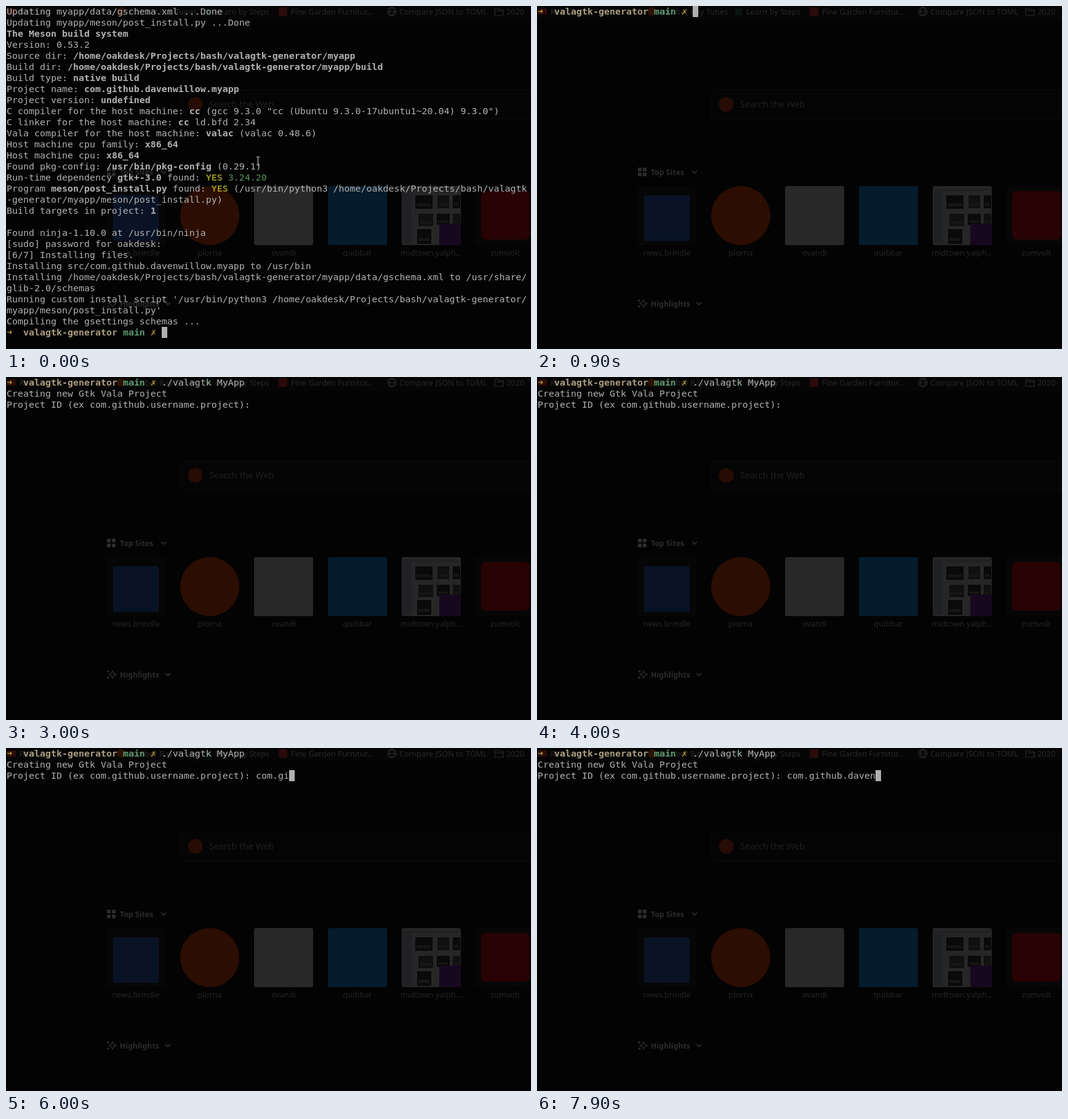
An HTML page for the animation above (8 s loop, 853x558 px).

```html
<!DOCTYPE html>
<html lang="en">
<head>
<meta charset="utf-8">
<title>Terminal session</title>
<style>
  html, body { margin: 0; width: 100%; height: 100%; overflow: hidden; background: #030303; }
  #stage { position: relative; width: 853px; height: 558px; overflow: hidden; }
  #stage > * { position: absolute; }
  svg { left: 0; top: 0; }
  svg text { font-family: "Noto Sans", "Open Sans", sans-serif; }
  pre, #live {
    margin: 0; left: 1px; top: 0; white-space: pre; color: #b2b2b2;
    font: 14.95px/18px "DejaVu Sans Mono", monospace;
  }
  pre i, #cursor { display: inline-block; width: 9px; height: 18px; vertical-align: top; font-style: normal; }
  #cursor { background: #b0b0b0; }
  .gold { color: #b8932a; }
  .sand { color: #aa9d80; }
  .leaf { color: #5b9a70; }
  .olive { color: #94911d; }
  .green { color: #5b9560; }
</style>
</head>
<body>
<div id="stage">
  <svg id="page" width="853" height="558" viewBox="0 0 853 558"></svg>
  <pre id="log"></pre>
  <pre id="fresh"></pre>
  <pre id="ask"></pre>
  <div id="live"><span id="typed"></span><span id="cursor"></span></div>
  <svg id="pointer" width="853" height="558">
    <path d="M407 245.5h2l.5 1 .5-1h2M409.5 246v12M407 258.5h2l.5-1 .5 1h2" fill="none" stroke="#ddd"/>
  </svg>
</div>
<script>
const $ = id => document.getElementById(id);

// Dimmed browser page behind the terminal
const rect = (x, y, w, h, fill, r = 0) => `<rect x="${x}" y="${y}" width="${w}" height="${h}" rx="${r}" fill="${fill}"/>`;
const disc = (x, y, r, fill) => `<circle cx="${x}" cy="${y}" r="${r}" fill="${fill}"/>`;
const line = (d, stroke = '#2a2a2a', w = 1.2) => `<path d="${d}" fill="none" stroke="${stroke}" stroke-width="${w}"/>`;
const label = (x, y, text, size = 12.8, fill = '#292929', extra = '') =>
  `<text x="${x}" y="${y}" font-size="${size}" fill="${fill}" ${extra}>${text}</text>`;
const chevron = (x, y) => line(`M${x - 4} ${y - 2}l4 4 4-4`, '#2c2c2c', 1.8);
const heading = (y, text, end) =>
  label(185, y + 4.5, text, 12.3, '#2c2c2c', 'font-weight="700"') + chevron(end, y);

const tileX = i => 163 + 120 * i;
const siteNames = ['news.brindle', 'plorna', 'ovandi', 'quibbar', 'midtown.yalph…', 'zumvolt'];

const bookmarks = [
  rect(0, 0, 853, 22, '#050505'),
  rect(2, 4, 14, 10, '#2c0c08'), label(22, 14, 'Reading'),
  disc(187, 9, 7, '#2c1204'), label(199, 14, 'Lumber Bay Tunes'),
  rect(322, 4, 11, 11, '#07150f'), label(340, 14, 'Learn by Steps'),
  rect(443, 2, 14, 14, '#2b0a0b'), label(463, 14, 'Fine Garden Furnitur…'),
  line('M620 9a7 7 0 1 0 14 0a7 7 0 1 0-14 0M620 9h14M627 2c-5 4-5 10 0 14c5-4 5-10 0-14'),
  label(639, 14, 'Compare JSON to TOML'),
  line('M794 15V4h5l2 2h7v9zM794 8h14'), label(813, 14, '2020'),
];

const search = [
  `<rect x="283.5" y="136.5" width="590" height="47" rx="4" fill="#040404" stroke="#0b0b0b"/>`,
  disc(307.5, 160, 12, '#260c05'),
  label(330, 165, 'Search the Web', 14.4, '#202020'),
];

const thumbs = [
  [665, 308, 28, 22], [701, 308, 19, 21], [726, 308, 12, 21],
  [670, 338, 24, 20], [700, 338, 21, 18], [726, 338, 12, 18], [668, 363, 23, 24],
];
const tiles = [
  ...[0, 5].map(i => rect(tileX(i), 293, 96, 96, '#060606', 4)),
  rect(174, 308, 74, 74, '#091325', 2),
  disc(331, 341, 48, '#2b0d02'),
  rect(tileX(2), 293, 96, 96, '#282828', 3),
  rect(tileX(3), 293, 96, 96, '#061b2b', 3),
  rect(tileX(4), 293, 96, 96, '#262626', 3),
  rect(645, 297, 14, 90, '#202124'), rect(660, 297, 76, 4, '#212121'),
  ...thumbs.map(([x, y, w, h], i) => rect(x, y, w, h, i % 2 ? '#101011' : '#0a0a0a') +
    rect(x + 2, y + h * .6, w - 5, h * .2, '#171615')),
  rect(704, 354, 35, 35, '#17081f'),
  rect(772, 301, 79, 79, '#290203', 8),
  ...siteNames.map((name, i) => label(tileX(i) + 48, 406, name, 12.8, '#252525', 'text-anchor="middle"')),
];

const headings = [
  ...[0, 1, 2, 3].map(i => rect(164 + i % 2 * 8, 263 + (i >> 1) * 8, 6, 6, '#2c2c2c', 1)),
  heading(270, 'Top Sites', 256),
  line('M173 478l2 4 4 2-4 2-2 4-2-4-4-2 4-2zM166 477v4M164 479h4M166 487v4M164 489h4', '#2c2c2c', 1.4),
  heading(484, 'Highlights', 263),
  line('M163.5 558V512', '#070707', 1),
];
$('page').innerHTML = [...bookmarks, ...search, ...tiles, ...headings].join('');

// Terminal text
const home = '/home/oakdesk/Projects/bash/valagtk';
const appId = 'com.github.davenwillow.myapp';
const yes = '<b class="olive">YES</b>';
const prompt = '<b><i class="gold">➜</i>  <span class="sand">valagtk-generator</span> ' +
  '<span class="leaf">main</span> <i class="gold">✗</i></b> ';

$('log').innerHTML = `Updating myapp/data/gschema.xml ...Done
Updating myapp/meson/post_install.py ...Done
<b>The Meson build system</b>
Version: 0.53.2
Source dir: <b>${home}-generator/myapp</b>
Build dir: <b>${home}-generator/myapp/build</b>
Build type: <b>native build</b>
Project name: <b>${appId}</b>
Project version: <b>undefined</b>
C compiler for the host machine: <b>cc</b> (gcc 9.3.0 "cc (Ubuntu 9.3.0-17ubuntu1~20.04) 9.3.0")
C linker for the host machine: <b>cc</b> ld.bfd 2.34
Vala compiler for the host machine: <b>valac</b> (valac 0.48.6)
Host machine cpu family: <b>x86_64</b>
Host machine cpu: <b>x86_64</b>
Found pkg-config: <b>/usr/bin/pkg-config</b> (0.29.1)
Run-time dependency <b>gtk+-3.0</b> found: ${yes} <span class="green">3.24.20</span>
Program <b>meson/post_install.py</b> found: ${yes} (/usr/bin/python3 ${home}
-generator/myapp/meson/post_install.py)
Build targets in project: <b>1</b>

Found ninja-1.10.0 at /usr/bin/ninja
[sudo] password for oakdesk:
[6/7] Installing files.
Installing src/${appId} to /usr/bin
Installing ${home}-generator/myapp/data/gschema.xml to /usr/share/
glib-2.0/schemas
Running custom install script '/usr/bin/python3 ${home}-generator/
myapp/meson/post_install.py'
Compiling the gsettings schemas ...
${prompt}`;
$('fresh').innerHTML = prompt;
$('ask').innerHTML = `${prompt}./valagtk MyApp
Creating new Gtk Vala Project
Project ID (ex com.github.username.project): `;

// Where typing happens on each screen: [column, row]
const entry = { log: [28, 29], fresh: [28, 0], ask: [45, 2] };

// [start ms, screen, typed text, cursor hidden]
const steps = [
  [0, 'log', ''],
  [300, 'log', '', true],
  [500, 'log', 'c'],
  [600, 'log', 'cl'],
  [700, 'log', 'cle'],
  [800, 'log', 'clear'],
  [900, 'fresh', ''],
  [1400, 'fresh', 'clear'],
  [1500, 'fresh', './valagtk MyApp'],
  [2100, 'ask', ''],
  [3000, 'ask', '', true],
  [3400, 'ask', ''],
  [4000, 'ask', '', true],
  [4600, 'ask', ''],
  [4800, 'ask', 'co'],
  [4900, 'ask', 'com'],
  [5100, 'ask', 'com.'],
  [5700, 'ask', 'com.', true],
  [5800, 'ask', 'com.'],
  [5900, 'ask', 'com.g'],
  [6000, 'ask', 'com.gi'],
  [6100, 'ask', 'com.git'],
  [6600, 'ask', 'com.githu'],
  [6800, 'ask', 'com.github'],
  [6900, 'ask', 'com.github.'],
  [7500, 'ask', 'com.github.', true],
  [7600, 'ask', 'com.github.d'],
  [7700, 'ask', 'com.github.da'],
  [7800, 'ask', 'com.github.dave'],
  [7900, 'ask', 'com.github.daven'],
];
const LOOP = 8000;
let shown;

function show(step) {
  const [start, screen, typed, hidden] = step;
  const [col, row] = entry[screen];
  for (const id in entry) $(id).style.visibility = id === screen ? 'visible' : 'hidden';
  $('live').style.left = 1 + col * 9 + 'px';
  $('live').style.top = row * 18 + 'px';
  $('typed').textContent = typed;
  $('cursor').style.visibility = hidden ? 'hidden' : 'visible';
  $('pointer').style.visibility = start < 500 ? 'visible' : 'hidden';
}

const origin = performance.now();
function tick() {
  const t = (performance.now() - origin) % LOOP;
  const step = steps.findLast(([start]) => start <= t);
  if (step !== shown) show(shown = step);
  requestAnimationFrame(tick);
}
tick();
</script>
</body>
</html>
```
